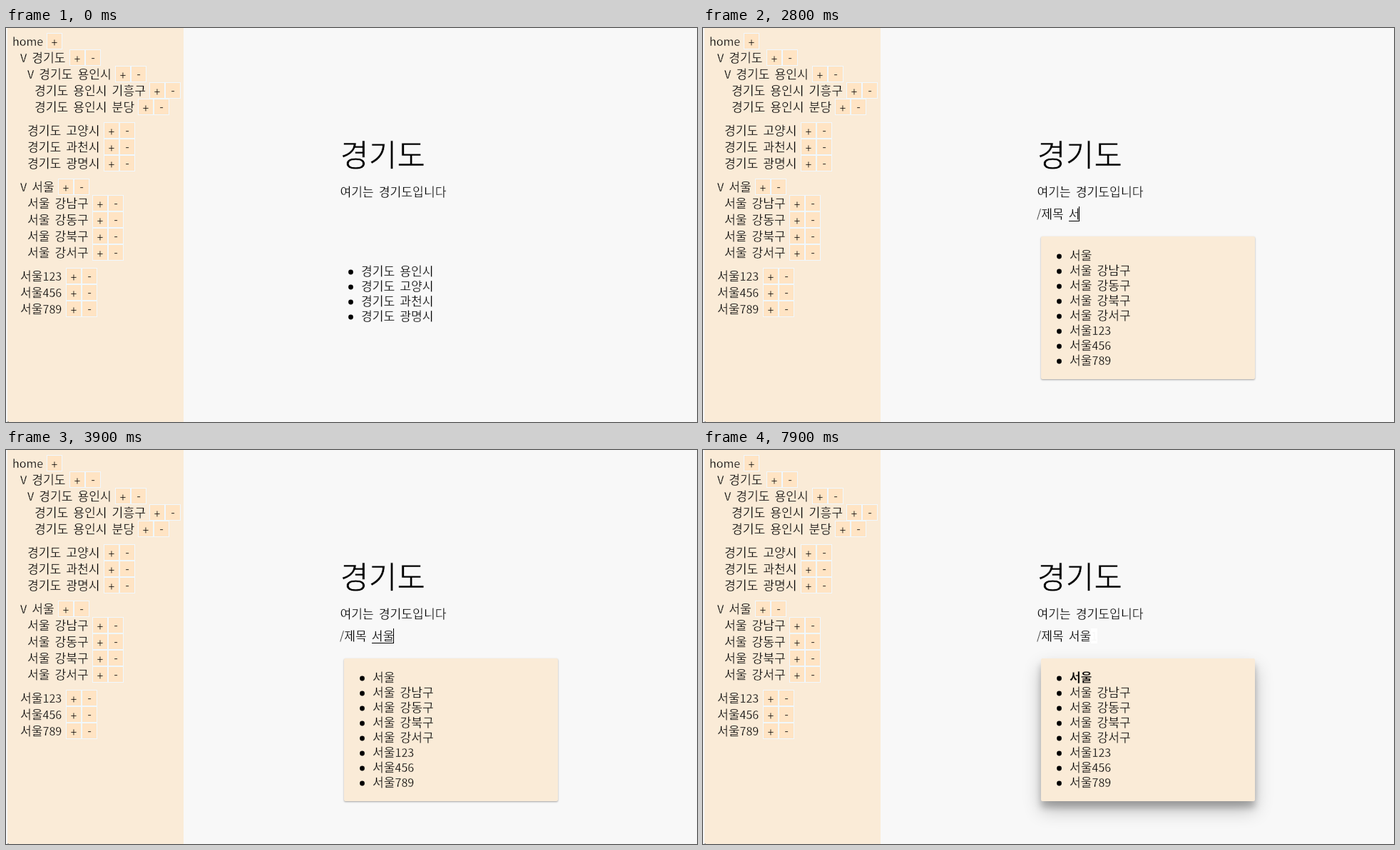
Animation of 969 by 552 pixels, one loop 8000 ms. Source, as an HTML page:

```html
<!DOCTYPE html>
<html lang="ko">
<head>
<meta charset="utf-8">
<title>문서 편집기</title>
<style>
  html, body { margin: 0; width: 100%; height: 100%; overflow: hidden; background: #f8f8f8; }
  #blank, #panel, svg { position: absolute; }
  #blank { left: 471px; top: 290px; width: 307px; height: 206px; border-radius: 6px; background: #fff; }
  #panel { left: 474px; top: 292px; width: 300px; height: 200px; border-radius: 2px; background: #faebd7; }
  svg { left: 0; top: 0; }
  /* A thin outline in the ground colour lightens the strokes. */
  text {
    font: 300 17.15px "Noto Sans CJK KR", "Noto Sans CJK", "Noto Sans", sans-serif;
    word-spacing: 2.2px;
    white-space: pre;
    stroke: #f8f8f8;
    stroke-width: .3px;
  }
  .beige text { stroke: #faebd7; }
  .latin { font-size: 16px; }
  .beige .button { font-size: 16px; text-anchor: middle; stroke: #ffe4c4; }
  .heading { font-size: 43.3px; stroke-width: .7px; }
</style>
</head>
<body>
<div id="blank"></div>
<div id="panel"></div>
<svg id="stage" width="969" height="552" viewBox="0 0 969 552"></svg>
<script>
const LOOP = 8000;
const BASELINE = 6;
const stage = document.getElementById('stage');
const blank = document.getElementById('blank');
const panel = document.getElementById('panel');

function add(parent, tag, attrs) {
  const node = document.createElementNS('http://www.w3.org/2000/svg', tag);
  for (const key in attrs) node.setAttribute(key, attrs[key]);
  parent.appendChild(node);
  return node;
}

// Latin runs are set slightly smaller than Hangul.
function setText(node, text) {
  node.textContent = '';
  for (const part of text.split(/([\w\/]+)/)) {
    if (!part) continue;
    if (/^[\w\/]/.test(part)) add(node, 'tspan', { class: 'latin' }).textContent = part;
    else node.appendChild(document.createTextNode(part));
  }
}

function label(parent, text, x, middle) {
  const node = add(parent, 'text', { x, y: middle + BASELINE });
  setText(node, text);
  return node;
}

function button(parent, sign, x, top) {
  add(parent, 'rect', { x: x + .5, y: top + .5, width: 21, height: 22, fill: '#ffe4c4', stroke: '#f0f8ff' });
  add(parent, 'text', { x: x + 11, y: top + 18.5, class: 'button' }).textContent = sign;
}

function bulletList(items, x, middle, style) {
  const group = add(stage, 'g', { class: style });
  group.rows = items.map((item, i) => {
    const y = middle + 21 * i;
    const row = add(group, 'g', {});
    add(row, 'circle', { cx: x - 15.5, cy: y + 1, r: 3.4 });
    label(row, item, x - 1, y);
    return row;
  });
  return group;
}

function show(node, visible) {
  node.style.display = visible ? '' : 'none';
}

// Sidebar rows: text, text x, row centre, first button x
const sidebar = add(stage, 'g', { class: 'beige' });
add(sidebar, 'rect', { x: 2, y: 0, width: 247, height: 552, fill: '#faebd7' });
add(sidebar, 'rect', { x: 2, y: 551, width: 2, height: 1, fill: '#aaa' });
[
  ['home', 9, 19, 57],
  ['V 경기도', 20, 42, 89],
  ['V 경기도 용인시', 30, 65, 153],
  ['경기도 용인시 기흥구', 40, 88, 201],
  ['경기도 용인시 분당', 40, 111, 185],
  ['경기도 고양시', 30, 144, 137],
  ['경기도 과천시', 30, 167, 137],
  ['경기도 광명시', 30, 190, 137],
  ['V 서울', 20, 223, 73],
  ['서울 강남구', 30, 246, 121],
  ['서울 강동구', 30, 269, 121],
  ['서울 강북구', 30, 292, 121],
  ['서울 강서구', 30, 315, 121],
  ['서울123', 20, 348, 84],
  ['서울456', 20, 371, 84],
  ['서울789', 20, 394, 84]
].forEach(([text, x, middle, buttonX]) => {
  label(sidebar, text, x, middle);
  button(sidebar, '+', buttonX, middle - 12);
  if (text !== 'home') button(sidebar, '-', buttonX + 22, middle - 12);
});

// Document
const heading = add(stage, 'text', { x: 468.7, y: 193.5, class: 'heading' });
heading.textContent = '경기도';
label(stage, '여기는 경기도입니다', 468.5, 230);
const pages = bulletList(['경기도 용인시', '경기도 고양시', '경기도 과천시', '경기도 광명시'], 499, 341, 'plain');
const matches = bulletList(['서울', '서울 강남구', '서울 강동구', '서울 강북구', '서울 강서구',
  '서울123', '서울456', '서울789'], 515, 319, 'beige');
const single = bulletList(['서울123'], 515, 319, 'beige');

// Input line
const cell = add(stage, 'rect', { x: 544, y: 250, width: 9, height: 21, fill: '#fff' });
const erased = label(stage, '1', 544, 261);
erased.setAttribute('fill', '#f8f8f8');
const typed = label(stage, '', 468, 261);
const underline = add(stage, 'rect', { y: 270, height: 1 });
const caret = add(stage, 'rect', { y: 250, width: 1, height: 21 });

// Start time, text, caret x, start of the composing underline, visible list
const edits = [
  [0, '', 468, 0, 'pages'],
  [1800, '/', 474, 0, 'pages'],
  [2200, '/ㅈ', 490, 475, 'pages'],
  [2400, '/제', 490, 475, 'pages'],
  [2500, '/제모', 505, 475, 'pages'],
  [2600, '/제목 ', 512, 0, 'pages'],
  [2700, '/제목 ㅅ', 527, 513, 'pages'],
  [2800, '/제목 서', 527, 513, 'all'],
  [3700, '/제목 성', 527, 513, 'blank'],
  [3800, '/제목 서우', 543, 513, 'blank'],
  [3900, '/제목 서울', 543, 513, 'all'],
  [5500, '/제목 서울1', 552, 0, 'single'],
  [6100, '/제목 서울', 543, 0, 'all']
];

// Caret on and off times
const blinks = [[800, 1300], [1800, 3300], [3700, 4400], [4800, 5300],
  [5500, 5900], [6400, 6900], [7400, 7800]];

function shadow(p) {
  const mix = (a, b) => a + (b - a) * p;
  return `0 ${mix(1, 14)}px ${mix(3, 28)}px rgba(0,0,0,${mix(.12, .25)}),` +
    `0 ${mix(1, 10)}px ${mix(2, 10)}px rgba(0,0,0,${mix(.24, .22)})`;
}

let current = null;
function draw(t) {
  const edit = edits.filter(e => e[0] <= t).pop();
  const [start, text, caretX, lineX, list] = edit;
  if (edit !== current) {
    setText(typed, text);
    current = edit;
  }
  caret.setAttribute('x', caretX);
  show(caret, blinks.some(([on, off]) => t >= on && t < off));
  show(underline, lineX > 0);
  underline.setAttribute('x', lineX);
  underline.setAttribute('width', Math.max(0, caretX - lineX));

  const open = list === 'all' || list === 'single';
  show(panel, open);
  show(blank, list === 'blank');
  show(pages, !open);
  show(matches, list === 'all');
  show(single, list === 'single');
  show(cell, start >= 5500);
  show(erased, start >= 6100);

  const hover = t < 7800 ? 0 : t < 7900 ? .4 : .9;
  panel.style.boxShadow = shadow(hover);
  matches.rows[0].lastChild.style.fontWeight = t >= 7900 ? 700 : '';
}

function tick() {
  draw(performance.now() % LOOP);
  requestAnimationFrame(tick);
}
tick();
</script>
</body>
</html>
```
